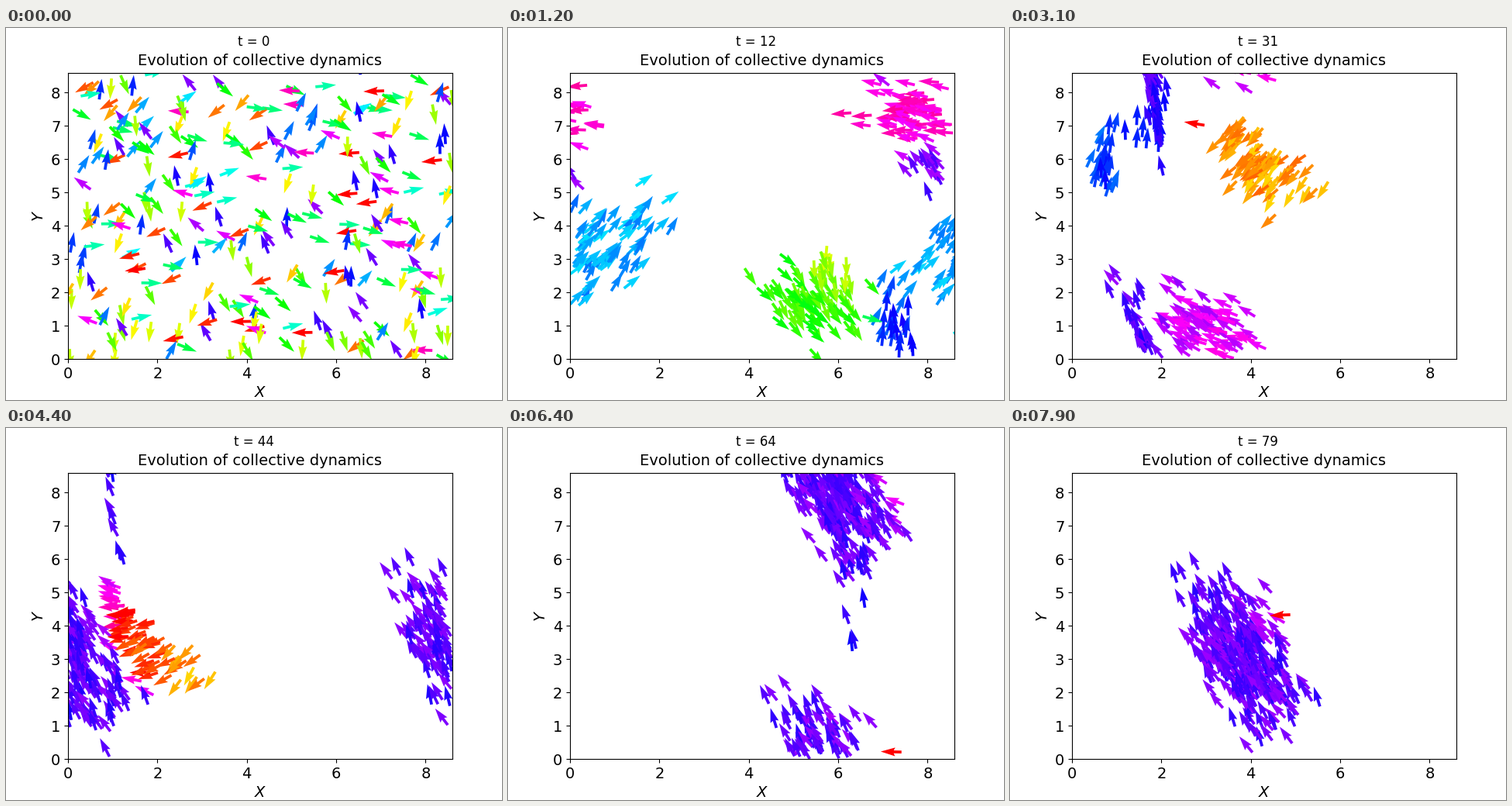
Write a matplotlib script that moves like this. It is 640 px wide and 480 px high and loops after 8000 ms.

```python
import numpy as np
import matplotlib.pyplot as plt
from matplotlib.animation import FuncAnimation

L, SPEED, FRAMES = 8.6, 0.28, 80
RADIUS, NOISE = 0.7, 0.26
SORTED, FLOCK_DIR = 12, 120      # step when streams are formed, final heading
rng = np.random.default_rng(7)

# size, x, y, spread, heading, later heading, joining step, delay along x
STREAMS = [
    (105, .4, 3.2, 1.10, 48, 62, 26, -5),
    (24, -1.4, .9, .50, 85, 52, 33, -2),
    (72, 7.8, 7.4, .80, 173, 163, 24, 3),
    (18, 8.1, 5.6, .45, 128, 128, 22, 0),
    (60, 5.1, 1.9, .70, -50, -132, 42, 9),
    (14, 5.8, 2.8, .50, -84, -130, 54, 6),
    (9, 6.1, 2.2, .60, -80, -128, 84, 2),
]


def ease(s):
    s = np.clip(s, 0, 1)
    return s * s * (3 - 2 * s)


def unit(deg):
    a = np.radians(deg)
    return np.stack([np.cos(a), np.sin(a)], axis=-1)


def nearest(d):
    return (d + L / 2) % L - L / 2


def oriented(deg, along, across):
    """Offsets along and across a heading as x, y."""
    return np.outer(along, unit(deg)) + np.outer(across, unit(deg + 90))


time = np.arange(FRAMES + 1)[:, None]


def stream(n, x, y, spread, heading, later, join, delay):
    """Positions of one stream at every step."""
    a, b = np.clip(rng.normal(size=(2, n)), -2, 2)
    offset = spread * oriented(heading, a, .6 * b)
    join = join + delay * offset[:, 0] / spread

    # turn to the later heading, then to that of the flock
    final = FLOCK_DIR if later > 0 else FLOCK_DIR - 360
    turn = heading + (later - heading) * ease((time - SORTED) / 16)
    turn = turn + (final - turn) * ease((time - join) / 12 + .5)
    path = np.cumsum(SPEED * unit(turn), axis=0)
    path += np.array([x, y]) + offset - path[SORTED]

    # random places at first
    scatter = nearest(rng.uniform(0, L, (n, 2)) - path[0])
    early = np.clip(1 - time / SORTED, 0, 1)**1.5

    # a slot in the long flock at last, late comers at its rear
    place = .6 - .06 * (join - 26) + 1.1 * a
    slot = oriented(114, place, .5 * b) + np.array([2.1, 8.2])
    slot = slot + SPEED * (time - 31)[..., None] * unit(FLOCK_DIR)
    gap = slot - path
    at = np.clip(join.astype(int), 0, FRAMES)
    gap -= L * np.round(gap[at, np.arange(n)] / L)
    return path + early[..., None] * scatter + ease((time - join) / 18)[..., None] * gap


track = np.concatenate([stream(*s) for s in STREAMS], axis=1)
track = track[:, rng.permutation(track.shape[1])]
N = track.shape[1]


def state(t):
    """Wrapped positions and headings, aligned with close neighbours."""
    pos = track[t] % L
    if t == 0:
        return pos, rng.uniform(-np.pi, np.pi, N)
    vel = track[t + 1] - track[t]
    vel /= np.hypot(vel[:, 0], vel[:, 1])[:, None] + 1e-9
    gap = nearest(pos[:, None] - pos[None])
    close = (gap**2).sum(axis=2) < RADIUS**2
    mean = close.astype(float) @ vel
    theta = np.arctan2(mean[:, 1], mean[:, 0])
    return pos, theta + rng.uniform(-NOISE, NOISE, N)


states = [state(t) for t in range(FRAMES)]

fig, ax = plt.subplots(figsize=(6.4, 4.8), dpi=100)
ax.set_xlim(0, L)
ax.set_ylim(0, L)
ax.tick_params(labelsize=14)
ax.set_xticks(range(0, 9, 2))
ax.set_yticks(range(9))
ax.set_xlabel("$X$", fontsize=14)
ax.set_ylabel("$Y$", fontsize=14)
ax.set_title("Evolution of collective dynamics", fontsize=14, pad=6.7)
clock = fig.suptitle("t = 0", fontsize=12, y=.982)

pos, theta = states[0]
arrows = ax.quiver(pos[:, 0], pos[:, 1], np.cos(theta), np.sin(theta),
                   np.degrees(theta), cmap="hsv", scale=18.5, width=.0075)
arrows.set_clim(-174, 222)


def draw(t):
    pos, theta = states[t]
    arrows.set_offsets(pos)
    arrows.set_UVC(np.cos(theta), np.sin(theta), np.degrees(theta))
    clock.set_text(f"t = {t}")
    return arrows, clock


anim = FuncAnimation(fig, draw, frames=FRAMES, interval=100,
                     init_func=lambda: draw(0), repeat=True, repeat_delay=0)
plt.show()
```
